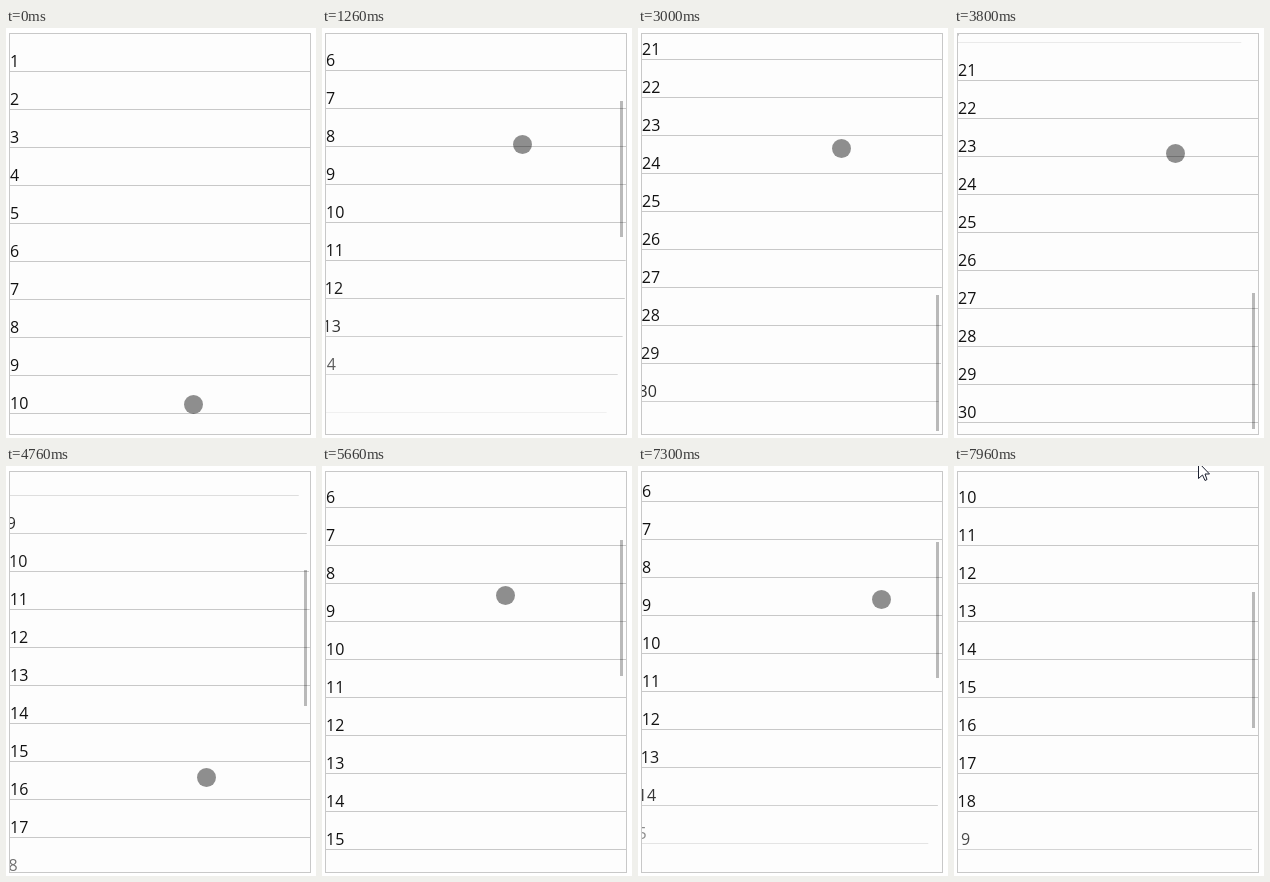
Animation of 310x410 px, one loop 8 s. Source, as an HTML page with a canvas:

```html
<!DOCTYPE html>
<html lang="en">
<head>
<meta charset="utf-8">
<title>Fly-in list</title>
<style>
html, body { margin: 0; width: 100%; height: 100%; overflow: hidden; background: #fff; }
canvas { display: block; }
</style>
</head>
<body>
<canvas id="stage" width="310" height="410"></canvas>
<script>
const ctx = document.getElementById('stage').getContext('2d');
const LOOP = 8000, ROWS = 30, ROW_HEIGHT = 38, MAX_SCROLL = 756;
const FLY = 25, SETTLE = 80;          // fly-in distance and time constant
const TOP_EDGE = 10, BOTTOM_EDGE = 395;

// Keys are [time, value, easing into this key].
const linear = u => u;
const push = u => u ** 1.5;
const coast = u => 1 - (1 - u) ** 2;
const smooth = u => u * u * (3 - 2 * u);

const scrollKeys = [
  [785, 0], [1260, 190, push], [2200, 470, coast],
  [2260, 470], [2700, 690, push], [3000, 772, coast], [3500, 756, smooth],
  [3765, 756], [4200, 540, push], [5300, 198, coast],
  [5620, 198], [6040, -6, push], [6200, -35, coast], [6650, 0, smooth],
  [6760, 0], [7300, 198, u => u ** 1.1], [8200, 355, coast]
];
const pointerX = [
  [120, 187], [210, 188], [360, 188], [510, 185], [660, 185],
  [1260, 200], [1500, 200], [2200, 178, smooth], [2340, 177], [2700, 195],
  [3500, 220, smooth], [3800, 221], [4200, 210], [5560, 183, smooth],
  [5660, 183], [6040, 195], [6760, 225, smooth], [7300, 243], [7960, 244]
];
const pointerY = [
  [120, 376], [210, 372], [360, 372], [510, 363], [660, 363],
  [785, 306, push], [1260, 116, push], [1500, 112, coast],
  [2200, 338, smooth], [2260, 338], [2700, 120, push], [3765, 120],
  [4200, 336, push], [4500, 345, coast], [5560, 123, smooth], [5620, 123],
  [6040, 327, push], [6760, 331], [7300, 133, u => u ** 1.1],
  [7440, 120, coast], [7960, -4, smooth]
];

function valueAt(keys, t) {
  const next = keys.findIndex(key => key[0] > t);
  if (next === 0) return keys[0][1];
  if (next < 0) return keys.at(-1)[1];
  const [t0, v0] = keys[next - 1];
  const [t1, v1, ease = linear] = keys[next];
  return v0 + (v1 - v0) * ease((t - t0) / (t1 - t0));
}

const scrollAt = t => Math.round(valueAt(scrollKeys, t));
const lineY = (row, scroll) => 5 + row * ROW_HEIGHT - scroll;

function isInside(row, t) {
  const y = lineY(row, scrollAt(t));
  return y >= TOP_EDGE && y <= BOTTOM_EDGE;
}

// 0 when a row is settled, 1 when it is fully flown out.
function flownOut(row, t) {
  const inside = isInside(row, t);
  let age = 0;
  while (age < 480 && t - age > 0 && isInside(row, t - age) === inside) age += 4;
  const rest = age >= 480 || t - age <= 0 ? 0 : Math.exp(-age / SETTLE);
  return inside ? rest : 1 - rest;
}

function drawRows(t, scroll) {
  ctx.font = '16px "Open Sans", "Noto Sans", sans-serif';
  for (let row = 1; row <= ROWS; row++) {
    const y = lineY(row, scroll);
    if (y < 0 || y > 425) continue;
    const out = flownOut(row, t);
    const x = 4 - FLY * out;
    ctx.globalAlpha = 1 - out * 0.95;
    ctx.fillStyle = '#c8c8c8';
    ctx.fillRect(x, y, 300, 1);
    ctx.fillStyle = '#111';
    ctx.fillText(row, x, y - 4);
  }
  ctx.globalAlpha = 1;
}

function drawScrollbar(t, scroll) {
  const alpha = Math.min(1, Math.max(0, (t - 785) / 250));
  const position = Math.min(1, Math.max(0, scroll / MAX_SCROLL));
  ctx.fillStyle = `rgba(0,0,0,${0.27 * alpha})`;
  ctx.fillRect(298, Math.round(8 + 259 * position), 3, 136);
}

function drawTouch(x, y) {
  ctx.fillStyle = 'rgba(0,0,0,.44)';
  ctx.beginPath();
  ctx.arc(x + 0.5, y + 0.5, 9.5, 0, 2 * Math.PI);
  ctx.fill();
}

function drawArrow(x, y) {
  const outline = [[0, 0], [0, 16], [4, 12.5], [6.5, 18], [8.5, 17], [6.5, 11.5], [11, 11.5]];
  ctx.beginPath();
  for (const [dx, dy] of outline) ctx.lineTo(x + 0.5 + dx, y + 0.5 + dy);
  ctx.closePath();
  ctx.fillStyle = '#fff';
  ctx.fill();
  ctx.strokeStyle = '#1c2030';
  ctx.lineWidth = 1;
  ctx.stroke();
}

function draw(t) {
  const scroll = scrollAt(t);
  ctx.fillStyle = '#fff';
  ctx.fillRect(0, 0, 310, 410);
  ctx.fillStyle = '#fdfdfd';
  ctx.fillRect(4, 6, 300, 400);

  ctx.save();
  ctx.beginPath();
  ctx.rect(4, 6, 300, 400);
  ctx.clip();
  drawRows(t, scroll);
  drawScrollbar(t, scroll);
  ctx.restore();

  ctx.strokeStyle = '#c8c8c8';
  ctx.lineWidth = 1;
  ctx.strokeRect(3.5, 5.5, 301, 401);

  const x = Math.round(valueAt(pointerX, t));
  const y = Math.round(valueAt(pointerY, t));
  (y < 0 ? drawArrow : drawTouch)(x, y);
}

const start = performance.now();
function tick() {
  draw((performance.now() - start) % LOOP);
  requestAnimationFrame(tick);
}
tick();
</script>
</body>
</html>
```
